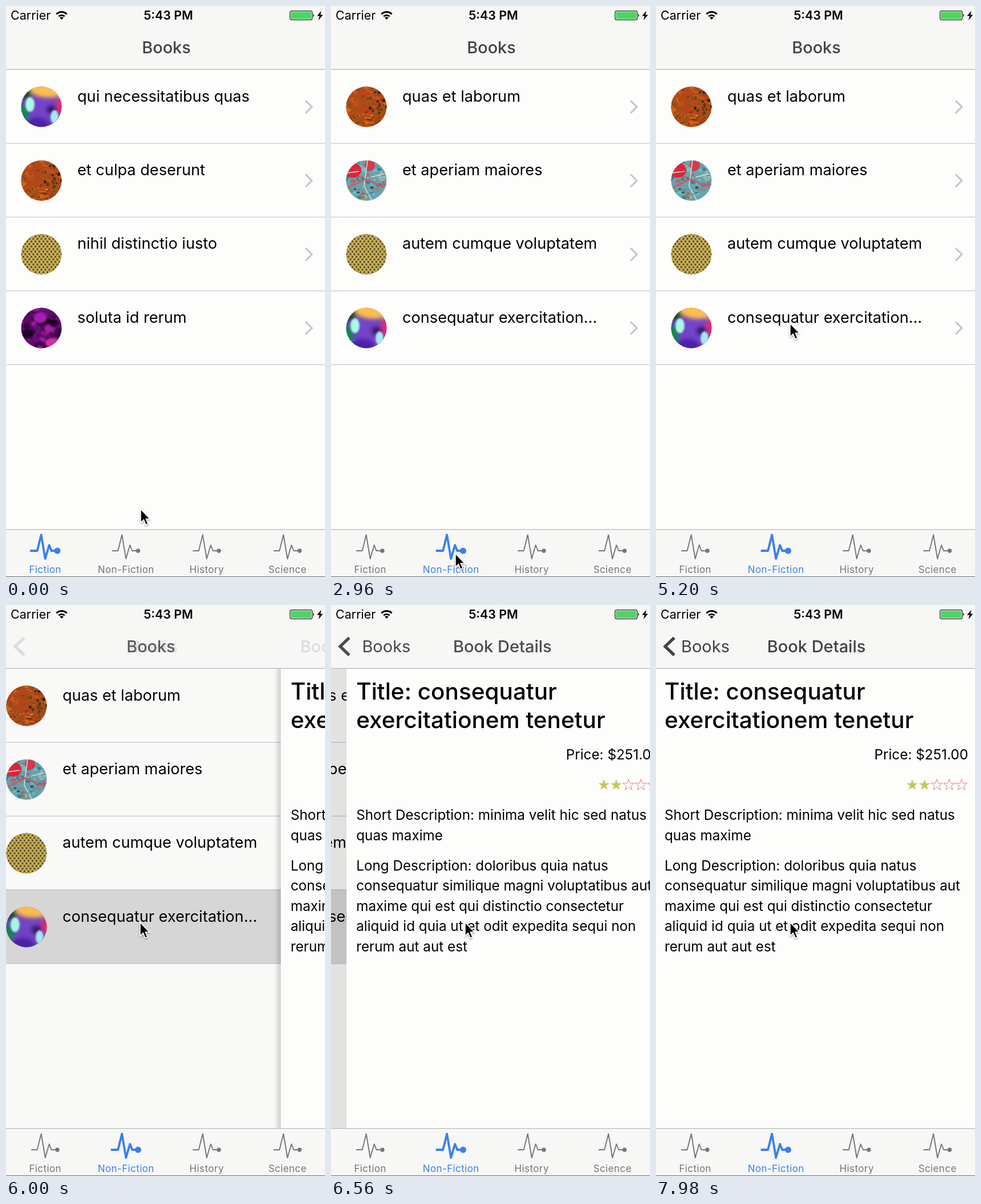
These frames come from a looping animation (559 by 1002 pixels, 8 s). An HTML page:

```html
<!DOCTYPE html>
<html lang="en">
<head>
<meta charset="utf-8">
<title>Books</title>
<style>
  html, body { margin: 0; width: 100%; height: 100%; overflow: hidden; background: #fdfdfc; }
  svg { display: block; width: 559px; height: 1002px; }
  text { font-family: Inter, "Open Sans", sans-serif; font-optical-sizing: none; white-space: pre; }
</style>
</head>
<body>
<svg id="stage" viewBox="0 0 559 1002" xmlns="http://www.w3.org/2000/svg"></svg>
<script>
const LOOP = 8000;
const ROW = 129.4, TOP = 111.5, BAR = 918;
const PAPER = '#fdfdfc', CHROME = '#f7f7f6', INK = '#424245';
const TAB_SWITCH = 50, PRESS = 119;
const TABS = ['Fiction', 'Non-Fiction', 'History', 'Science'];
const FICTION = [
  ['disco', 'qui necessitatibus quas'], ['rust', 'et culpa deserunt'],
  ['mesh', 'nihil distinctio iusto'], ['nebula', 'soluta id rerum']];
const NON_FICTION = [
  ['rust', 'quas et laborum'], ['graffiti', 'et aperiam maiores'],
  ['mesh', 'autem cumque voluptatem'], ['disco', 'consequatur exercitation…']];

// Keys: [frame, ...values]
const SLIDE = [[126.4, 0], [128, .0687], [134, .3333], [146, .7114], [155, 1]];
const POINTER = [[0, 236, 883], [28, 236, 883], [44, 218, 961], [68, 218, 961], [89, 232, 581], [100, 235, 557]];

const clamp = v => Math.min(1, Math.max(0, v));
const smooth = v => v * v * (3 - 2 * v);

function track(keys, frame, ease = v => v) {
  const i = Math.max(1, keys.findIndex(k => k[0] >= frame));
  const [a, b] = frame >= keys.at(-1)[0] ? keys.slice(-2) : [keys[i - 1], keys[i]];
  const k = ease(clamp((frame - a[0]) / (b[0] - a[0])));
  return a.slice(1).map((v, j) => v + (b[j + 1] - v) * k);
}

// cubic-bezier(.36, .66, .04, 1)
function pageEase(x) {
  let lo = 0, hi = 1;
  for (let i = 0; i < 24; i++) {
    const s = (lo + hi) / 2, u = 1 - s;
    if (1.08 * s * u * u + .12 * s * s * u + s ** 3 < x) lo = s; else hi = s;
  }
  const u = 1 - lo;
  return 1 - u ** 3 - 1.02 * lo * u * u;
}

const text = (x, y, size, content, attrs = '') =>
  `<text x="${x}" y="${y}" font-size="${size}" ${attrs}>${content}</text>`;
const rect = (x, y, w, h, fill, attrs = '') =>
  `<rect x="${x}" y="${y}" width="${w}" height="${h}" fill="${fill}" ${attrs}/>`;
const line = (d, color, width, attrs = '') =>
  `<path d="${d}" fill="none" stroke="${color}" stroke-width="${width}" ${attrs}/>`;
const ellipse = (x, y, rx, ry, fill) =>
  `<ellipse cx="${x}" cy="${y}" rx="${rx}" ry="${ry}" fill="${fill}"/>`;

function blots(seed, count, size, colors) {
  const random = () => (seed = (seed * 16807) % 2147483647) / 2147483647;
  let out = '';
  for (let i = 0; i < count; i++) {
    const r = size * (.3 + random());
    out += ellipse(random() * 72 - 36, random() * 72 - 36, r, r * (.4 + random() * .6), colors[i % colors.length]);
  }
  return out;
}

const art = {
  disco: rect(-36, -36, 72, 72, '#7444c8') + `<g filter="url(#soft)">` +
    ellipse(12, -33, 34, 17, '#fcbf4c') + ellipse(36, -4, 9, 17, '#ef2867') +
    ellipse(-31, -24, 14, 11, '#174f2c') + ellipse(-33, 14, 10, 18, '#0d8a4b') +
    ellipse(18, 5, 9, 7, '#33195f') + ellipse(-8, 31, 22, 12, '#4b24a6') +
    ellipse(29, 30, 8, 13, '#20246b') + '</g><g filter="url(#glow)">' +
    ellipse(-20, -4, 8, 13, '#a9fbe4') + ellipse(23, 18, 7, 12, '#a4eaf5') + '</g>',
  rust: rect(-36, -36, 72, 72, '#ac4a18') +
    blots(41, 160, 3.5, ['#c2501c', '#8c3d13', '#c83f18', '#96501a', '#cc661a']) +
    `<g transform="translate(24 -14) scale(.5 .8)">${blots(77, 50, 4, ['#4b3b17', '#6b4a18', '#2a2512'])}</g>` +
    `<g transform="translate(-12 24) scale(.6 .3)">${blots(19, 26, 4, ['#e49a1d', '#5a3815', '#d6651a'])}</g>`,
  mesh: rect(-36, -36, 72, 72, 'url(#weave)'),
  nebula: rect(-36, -36, 72, 72, '#5c0b68') +
    `<g filter="url(#glow)">${blots(23, 50, 8, ['#8d168f', '#36063f', '#a51ca9', '#1d0424', '#6a0f78'])}` +
    ellipse(20, 26, 13, 8, '#d22f9c') + ellipse(-2, -18, 11, 9, '#a91bb5') + ellipse(-24, 10, 12, 8, '#1b0320') + '</g>',
  graffiti: rect(-36, -36, 72, 72, '#6aa3ac') +
    blots(58, 90, 4, ['#54c3d6', '#7c8f98', '#3f7f94', '#b5666a', '#8fb9b4']) +
    ellipse(-24, -18, 15, 13, '#dc2638') + ellipse(6, -27, 9, 10, '#d63a4c') +
    line('M-36-13L-12-16M2-36L-4 10L10 36M8-6L34-12', '#d5d2d6', 1.8) +
    line('M-32 12L-2-2L30 12', '#c4606a', 3) +
    `<g transform="translate(-12 24) scale(.6 .4)">${blots(9, 24, 4, ['#d97c2d', '#284d58', '#4d8b4c'])}</g>`
};

const avatar = (name, y) => `<g transform="translate(62 ${y})" clip-path="url(#round)">${art[name]}</g>`;

function list(id, books) {
  return `<g id="${id}">` + books.map(([image, title], i) => {
    const y = TOP + i * ROW;
    return avatar(image, y + 65.3) + text(125, y + 56, 27.15, title) +
      line(`M525 ${y + 54.5}l11 11l-11 11`, '#c7c7cc', 3.2) +
      rect(0, y + ROW - .5, 563, 1.3, '#cbcbd0');
  }).join('') + '</g>';
}

function star(x, filled) {
  const points = Array.from({ length: 10 }, (_, i) => {
    const r = i % 2 ? 4.1 : 10.4, a = i * Math.PI / 5;
    return `${x + r * Math.sin(a)},${316 - r * Math.cos(a)}`;
  }).join(' ');
  return `<polygon points="${points}" ${filled ? 'fill="#c5c75a"' : 'fill="none" stroke="#d07a76" stroke-width=".9"'}/>`;
}

const PARAGRAPHS = [
  [377, 'Short Description: minima velit hic sed natus'], [412.5, 'quas maxime'],
  [465.5, 'Long Description: doloribus quia natus'], [501, 'consequatur similique magni voluptatibus aut'],
  [536.5, 'maxime qui est qui distinctio consectetur'], [572, 'aliquid id quia ut et odit expedita sequi non'],
  [607.5, 'rerum aut aut est']];

const detail = rect(-12, 111, 12, 807, 'url(#edge)', 'id="shadow"') + rect(0, 111, 565, 807, PAPER) +
  text(17, 166, 40.5, 'Title: consequatur', 'font-weight="500"') +
  text(17, 216, 40.5, 'exercitationem tenetur', 'font-weight="500"') +
  text(549, 271, 24.3, 'Price: $251.00', 'text-anchor="end"') +
  [0, 1, 2, 3, 4].map(i => star(451 + i * 21.6, i < 2)).join('') +
  PARAGRAPHS.map(([y, s]) => text(17, y, 24.25, s)).join('');

function tabBar(active) {
  return TABS.map((label, i) => {
    const x = 68.7 + i * 141.5, on = i === active, color = on ? '#3b80ea' : '#76767a';
    const reach = on ? 26.5 : 24.5;
    return line(`M${x - reach} 956H${x - 14}L${x - 7} 928L${x} 970L${x + 7} 946L${x + 11} 956H${x + 20}`,
      color, on ? 3.8 : 1.9, 'stroke-linejoin="round"') +
      `<circle cx="${x + 21.3}" cy="956" r="${on ? 5.5 : 3.7}" fill="${color}"/>` +
      text(x, 995, 17, label, `fill="${color}" text-anchor="middle" letter-spacing=".4"`);
  }).join('');
}

const statusBar = text(8, 24, 21.5, 'Carrier') +
  text(284.5, 24, 21.4, '5:43 PM', 'font-weight="600" text-anchor="middle"') +
  line('M88.3 14.3A13 13 0 0 1 106.7 14.3M92.3 18.3A7.4 7.4 0 0 1 102.7 18.3', '#000', 2.9) +
  '<path d="M97.5 24L94.2 20.6A4.7 4.7 0 0 1 100.8 20.6Z"/>' +
  rect(497.7, 8.7, 39, 15.6, PAPER, 'rx="3" stroke="#222" stroke-width="1.2"') +
  rect(499.2, 10.2, 36, 12.6, '#4cd562', 'rx="1.5"') +
  '<path d="M538.3 13.5q3 3 0 6z"/><path d="M552.5 8.5L545 17.5H549.5L547.5 25L555.5 15.5H551Z"/>';

const navTitle = `font-weight="500" fill="${INK}" text-anchor="middle"`;

const stage = document.getElementById('stage');
stage.innerHTML = `
  <defs>
    <clipPath id="round"><circle r="35.5"/></clipPath>
    <clipPath id="content"><rect y="111" width="559" height="807"/></clipPath>
    <filter id="soft"><feGaussianBlur stdDeviation="3.5"/></filter>
    <filter id="glow"><feGaussianBlur stdDeviation="1.8"/></filter>
    <pattern id="weave" width="7" height="9" patternUnits="userSpaceOnUse">
      ${rect(0, 0, 7, 9, '#c9b158')}${line('M0 0L7 9M7 0L0 9', '#8d7834', .8)}
      ${ellipse(3.5, 4.5, 1.5, 1.3, '#362d18')}${[0, 7].map(x => ellipse(x, 0, 1.5, 1.3, '#362d18') + ellipse(x, 9, 1.5, 1.3, '#362d18')).join('')}
    </pattern>
    <linearGradient id="edge"><stop stop-opacity="0"/><stop offset="1" stop-opacity=".2"/></linearGradient>
    <filter id="drop" x="-50%" y="-50%" width="200%" height="200%">
      <feDropShadow dx="0" dy="2" stdDeviation="1.5" flood-opacity=".35"/>
    </filter>
  </defs>
  ${rect(0, 0, 559, 1002, PAPER)}
  <g clip-path="url(#content)">
    <g id="lists">
      ${rect(0, TOP + 3 * ROW - 1, 563, ROW + 2, '#d9d9d9', 'id="pressed"')}
      ${list('fiction', FICTION)}${list('nonFiction', NON_FICTION)}
    </g>
    ${rect(0, 111, 559, 807, '#000', 'id="shade"')}
    <g id="detail">${detail}</g>
  </g>
  ${rect(0, 0, 559, 111, CHROME)}${rect(0, 110.7, 559, 1.3, '#b7b7b9')}
  ${statusBar}
  ${text(281, 83, 28.8, 'Books', navTitle + ' id="oldTitle"')}
  ${text(281, 83, 29, 'Book Details', navTitle + ' id="newTitle"')}
  ${text(44, 83, 29, 'Books', `fill="${INK}" id="backLabel"`)}
  ${line('M32 57.5L16 72.7L32 88', INK, 5.2, 'id="backArrow"')}
  ${rect(0, BAR, 559, 84, CHROME)}${rect(0, BAR, 559, 1.2, '#b7b7b9')}
  <g id="tabs"></g>
  ${rect(0, 1001, 559, 1, '#6c6c6e')}
  <path id="pointer" d="M0 0V23.5L5.3 18.6L9 27.3L13 25.6L9.3 17.1H16.3Z" stroke="#fff" stroke-width="1.5" filter="url(#drop)"/>`;

const el = Object.fromEntries([...stage.querySelectorAll('[id]')].map(node => [node.id, node]));
const move = (node, x, y = 0) => node.setAttribute('transform', `translate(${x} ${y})`);
const fade = (node, alpha) => node.setAttribute('opacity', alpha);
const show = (node, visible) => node.setAttribute('display', visible ? 'inline' : 'none');

// The picture advances in a repeating 20, 100, 20 ms rhythm.
function frameAt(ms) {
  const phase = ms % 140;
  return 3 * Math.floor(ms / 140) + (phase < 20 ? 0 : phase < 120 ? 1 : 2);
}

function render(frame) {
  const switched = frame >= TAB_SWITCH;
  const p = pageEase(track(SLIDE, frame)[0]), rest = 1 - p;

  show(el.fiction, !switched);
  show(el.nonFiction, switched);
  el.tabs.innerHTML = tabBar(switched ? 1 : 0);
  fade(el.pressed, clamp((frame - PRESS) / 3));

  move(el.lists, -187.3 * p);
  fade(el.shade, .11 * p);
  show(el.detail, p > 0);
  move(el.detail, 562 * rest - 2);
  fade(el.shadow, rest);

  move(el.oldTitle, -194 * p);
  fade(el.oldTitle, rest);
  move(el.newTitle, 373 * rest);
  fade(el.newTitle, p);
  move(el.backLabel, 200 * rest);
  fade(el.backLabel, p);
  fade(el.backArrow, p);

  move(el.pointer, ...track(POINTER, frame, smooth));
}

let shown = -1;
function tick() {
  const frame = frameAt(performance.now() % LOOP);
  if (frame !== shown) render(shown = frame);
  requestAnimationFrame(tick);
}
tick();
</script>
</body>
</html>
```
